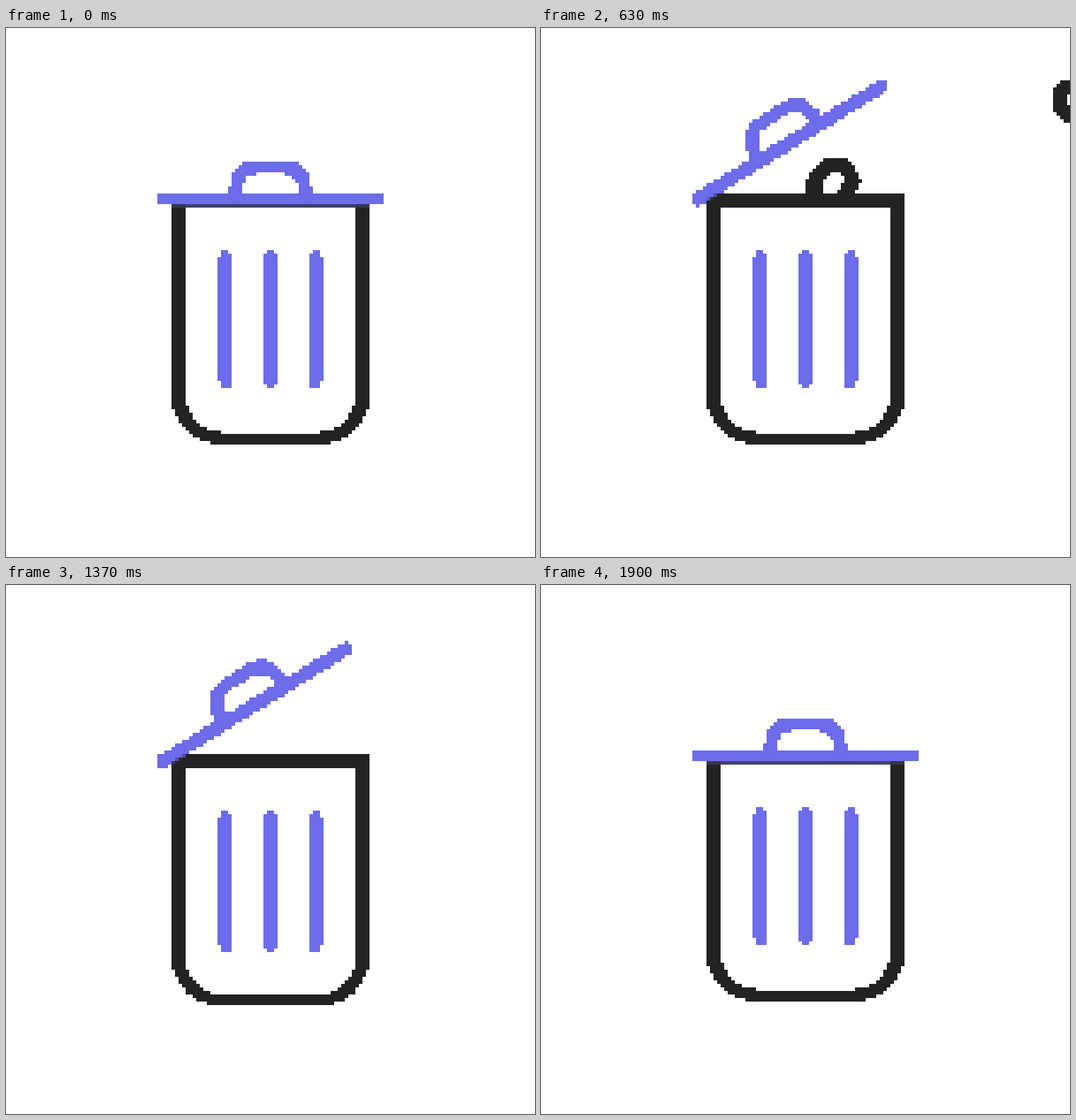
Recreate the animation shown at these times as an HTML page with a canvas. Size 748 by 748 pixels, loop 2260 ms.

```html
<!DOCTYPE html>
<html lang="en">
<head>
<meta charset="utf-8">
<title>Trash can</title>
<style>
  html, body { margin: 0; height: 100%; overflow: hidden; background: #fff; }
  /* 5 px cells, centred on the 748 px stage */
  canvas { position: absolute; left: -1px; top: -1px; width: 750px; height: 750px; image-rendering: pixelated; }
</style>
</head>
<body>
<canvas id="stage" width="150" height="150"></canvas>
<script>
const SIZE = 150, LOOP = 2260, LAST = 57;
const INK = '#232323', VIOLET = '#6d6cea';
const OPEN_ANGLE = 31.5 * Math.PI / 180;
const ctx = document.getElementById('stage').getContext('2d', { willReadFrequently: true });

// Each ball enters at step `from` and passes (x, y) at step `to`.
const balls = [
  { from: 10, to: 19, x: 82.6, y: 44, turn: -0.785, size: 1 },
  { from: 18, to: 26, x: 99.3, y: 39.5, turn: 0.785, size: 1 },
  { from: 25.5, to: 35, x: 93, y: 31.6, turn: 0.1, size: 0.88 }
];
const crumple = [[-6, 1.6], [-4.8, -3.2], [-1, -4.6], [3.4, -4.2],
                 [6, -0.4], [4.4, 4], [0.6, 4.6], [-3.8, 4.4]];
// Start, length and depth of each dip of the can.
const dips = [[3, 7, 2], [20, 6, 2], [28, 7, 2], [39, 8, 2], [51.5, 5.5, 1]];

function smooth(step, start, length) {
  const p = Math.min(1, Math.max(0, (step - start) / length));
  return p * p * (3 - 2 * p);
}

function dipAt(step) {
  return dips.reduce((sum, [start, length, depth]) => {
    const p = (step - start) / length;
    return sum + (p > 0 && p < 1 ? depth * Math.sin(Math.PI * p) : 0);
  }, 0);
}

function canOutline(left, top, cornerX, radius, angle) {
  const right = SIZE - left;
  ctx.moveTo(left, top);
  ctx.lineTo(right, top);
  ctx.lineTo(right, 107.5);
  ctx.arc(SIZE - cornerX, 105, radius, angle, Math.PI / 2);
  ctx.arc(cornerX, 105, radius, Math.PI / 2, Math.PI - angle);
  ctx.lineTo(left, 107.5);
  ctx.closePath();
}

function drawCan() {
  ctx.fillStyle = INK;
  ctx.beginPath();
  canOutline(47, 47, 60.5, 12.85, 0.2);
  canOutline(51, 50.5, 61, 9.8, 0.27);
  ctx.fill('evenodd');

  ctx.fillStyle = VIOLET;
  ctx.fillRect(74, 63, 2, 39);
  ctx.fillRect(73, 64, 4, 37);
  for (const side of [1, -1]) {
    ctx.save();
    ctx.translate(75, 0);
    ctx.scale(side, 1);
    ctx.fillRect(-14, 63, 2, 39);
    ctx.fillRect(-14, 64, 3, 38);
    ctx.fillRect(-15, 65, 4, 35);
    ctx.restore();
  }
}

function drawLid(angle) {
  ctx.save();
  ctx.translate(44.6, 48.55);
  ctx.rotate(-angle);
  ctx.translate(-44.6, -48.55);
  ctx.strokeStyle = VIOLET;
  ctx.lineCap = 'round';
  ctx.lineWidth = 3.6;
  ctx.beginPath();
  ctx.moveTo(44.6, 48.55);
  ctx.lineTo(105.4, 48.55);
  ctx.stroke();
  ctx.lineWidth = 3.4;
  ctx.beginPath();
  ctx.moveTo(65, 48);
  ctx.bezierCurveTo(65, 42.5, 66.5, 39.55, 71, 39.55);
  ctx.lineTo(79, 39.55);
  ctx.bezierCurveTo(83.5, 39.55, 85, 42.5, 85, 48);
  ctx.stroke();
  ctx.restore();
}

function drawBall(ball, step) {
  const p = (step - ball.from) / (ball.to - ball.from);
  if (p <= 0 || p > 1.6) return;
  const x = 157.5 - (157.5 - ball.x) * p ** 1.2;
  const y = 20.5 + (ball.y - 20.5) * p ** 3;
  ctx.save();
  ctx.beginPath();
  ctx.rect(0, 0, SIZE, 48);
  ctx.clip();
  ctx.fillStyle = ctx.strokeStyle = INK;
  ctx.fillRect(Math.round(x - 8), Math.floor(y + 0.5), 2, 1);
  ctx.translate(x, y);
  ctx.rotate(ball.turn - 0.3 * (step - ball.to));
  ctx.scale(ball.size, ball.size);
  ctx.lineWidth = 3.8 / ball.size;
  ctx.lineJoin = 'round';
  ctx.beginPath();
  crumple.forEach(point => ctx.lineTo(...point));
  ctx.closePath();
  ctx.stroke();
  ctx.restore();
}

// Make every cell either solid or empty.
function hardenEdges() {
  const image = ctx.getImageData(0, 0, SIZE, SIZE);
  for (let i = 3; i < image.data.length; i += 4) {
    image.data[i] = image.data[i] < 77 ? 0 : 255;
  }
  ctx.putImageData(image, 0, 0);
}

function draw(step) {
  ctx.clearRect(0, 0, SIZE, SIZE);
  balls.forEach(ball => drawBall(ball, step));
  ctx.save();
  ctx.translate(0, dipAt(step));
  drawCan();
  drawLid(OPEN_ANGLE * (smooth(step, 1, 6.7) - smooth(step, 46.6, 6.7)));
  ctx.restore();
  hardenEdges();
}

const begin = performance.now();
function tick() {
  const time = (performance.now() - begin) % LOOP;
  draw(Math.min(LAST, Math.floor((time + 5) * 0.03)));
  requestAnimationFrame(tick);
}
tick();
</script>
</body>
</html>
```
